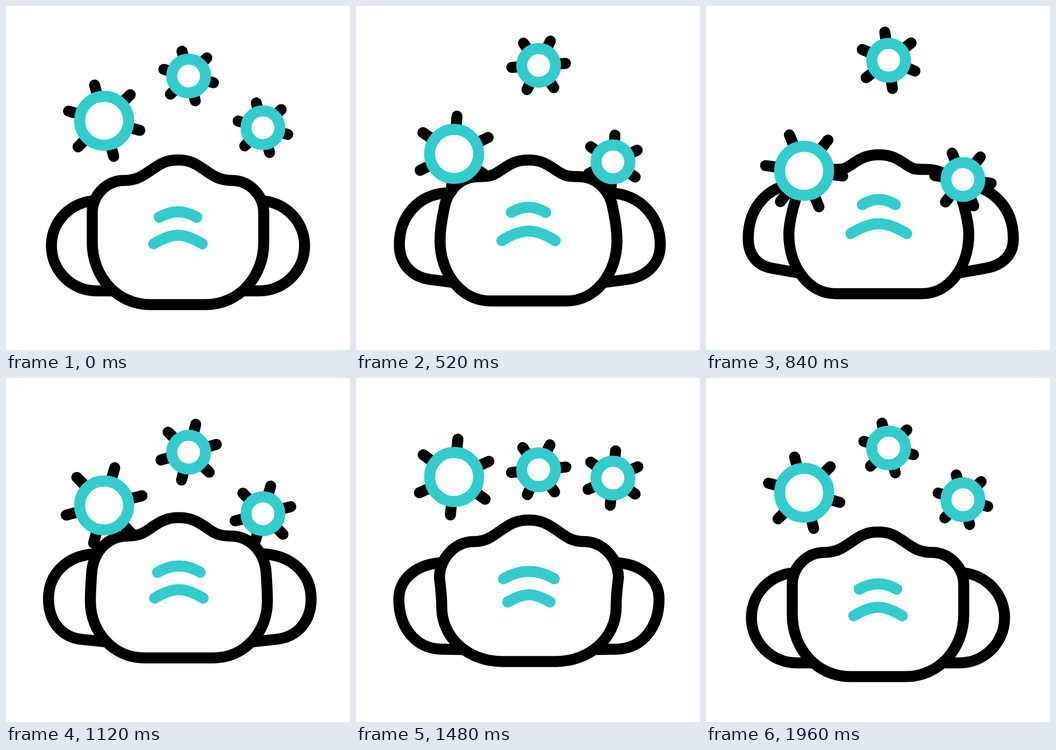
An HTML page with a canvas for the animation above (2 s loop, 640 by 640 pixels).

```html
<!DOCTYPE html>
<html>
<head>
<meta charset="utf-8">
<style>
html, body { margin: 0; width: 100%; height: 100%; overflow: hidden; background: #fff; }
canvas { display: block; width: 640px; height: 640px; }
</style>
</head>
<body>
<canvas id="c" width="640" height="640"></canvas>
<script>
const ctx = document.getElementById('c').getContext('2d');
const LOOP = 2000, STEP = 40, LINE = 20.5;
const BEGIN = 120, END = 1960, SQUASH = 780, STRETCH = 1420;
const TEAL = '#33cccc', BLACK = '#000', WHITE = '#fff';

const clamp = u => Math.min(1, Math.max(0, u));
const ease = u => u * u * (3 - 2 * u);
const ramp = (t, from, to) => ease(clamp((t - from) / (to - from)));

// Everything goes from rest to a squashed pose, to a stretched pose and back.
// The blend adds the offset of each pose by its current weight.
function blend(t, peak = STRETCH) {
  const turn = ramp(t, SQUASH, peak);
  const squash = ramp(t, BEGIN + 20, SQUASH) - turn;
  const stretch = turn - ramp(t, peak, END);
  return (rest, a, b) => rest + squash * a + stretch * b;
}

function trace(p) {
  ctx.beginPath();
  ctx.moveTo(...p[0]);
  for (let i = 1; i + 2 < p.length; i += 3) {
    ctx.bezierCurveTo(...p[i], ...p[i + 1], ...p[i + 2]);
  }
}

function stroke(color) {
  ctx.strokeStyle = color;
  ctx.stroke();
}

const flip = (p, cx) => p.map(([x, y]) => [2 * cx - x, y]);

function strap(mix, edge) {
  const top = [168, mix(362.5, -23, 3)];
  const side = [edge, mix(446, -3, -13)];
  const corner = [mix(168, -46, -10), mix(530, -33, -3.5)];
  const tail = [mix(200, -28, 0), mix(530, -24, -2.5)];
  const k = mix(0.55, 0.07, 0.07);
  const reach = k * (corner[0] - edge);
  const slope = (tail[1] - corner[1]) / (tail[0] - corner[0]);
  return [
    top,
    [top[0] - k * (top[0] - edge), top[1] + mix(0, 5, 0)],
    [edge, side[1] - 0.55 * (side[1] - top[1])],
    side,
    [edge, side[1] + 0.55 * (corner[1] - side[1])],
    [corner[0] - reach, corner[1] - slope * reach],
    corner,
    corner, tail, tail
  ];
}

function mask(mix, cx) {
  const shoulder = [mix(220, 13, 0), mix(324.5, -11, 2)];
  const [ax, ay] = [mix(160.5, 5, -5.5), mix(385, -11, 9)];
  const [bx, by] = [mix(160.5, -6.5, -1), mix(440, -6, 9)];
  const [dx, dy] = [mix(268, -28, 4), mix(555.5, -10.5, -6)];
  const [sx, sy] = shoulder;
  const half = [
    [cx, 286.5],
    [cx - 25, 286.5], [284, 296], [273, 303.3],
    [257, 314], [sx + 25, sy], shoulder,
    [sx - 0.55 * (sx - ax), sy], [ax + mix(0, 8, 1), ay - 0.55 * (ay - sy)], [ax, ay],
    [ax, ay], [bx, by - 0.4 * (by - ay)], [bx, by],
    [bx, by + 0.55 * (dy - by)], [dx - 0.57 * (dx - bx), dy], [dx, dy]
  ];
  const other = flip(half, cx).reverse();
  trace([...half, [dx, dy], other[0], ...other]);
  ctx.closePath();
  ctx.fillStyle = WHITE;
  ctx.fill();
  stroke(BLACK);
}

function fold(cx, half, y, peak, pull) {
  const c = (peak - 0.25 * y) / 0.75, d = half * (1 - 2 * pull);
  trace([[cx - half, y], [cx - d, c], [cx + d, c], [cx + half, y]]);
  stroke(TEAL);
}

function germ(x, y, r, reach, deg) {
  ctx.beginPath();
  for (let i = 0; i < 6; i++) {
    const a = (deg + 60 * i) * Math.PI / 180;
    ctx.moveTo(x + r * Math.cos(a), y + r * Math.sin(a));
    ctx.lineTo(x + reach * Math.cos(a), y + reach * Math.sin(a));
  }
  stroke(BLACK);
  ctx.beginPath();
  ctx.arc(x, y, r, 0, 2 * Math.PI);
  ctx.fillStyle = WHITE;
  ctx.fill();
  stroke(TEAL);
}

function drawMask(t) {
  const mix = blend(t), cx = mix(320, 1.5, 1.8);
  const lift = 30 * (ramp(t, 580, 1260) - ramp(t, 1260, 1920));
  ctx.save();
  ctx.translate(0, -lift);
  trace(strap(mix, mix(84.5, -6, -5)));
  stroke(BLACK);
  trace(flip(strap(mix, mix(84.5, -13.5, -5)), cx));
  stroke(BLACK);
  mask(mix, cx);
  fold(cx, mix(35, -4.7, 12.7), mix(393, -14, 3), mix(383, -13.5, -1), 0.33);
  fold(cx, mix(45.3, 7, -6), mix(442.5, -9.5, -3.5), mix(426.5, -12, -1), 0.39);
  ctx.restore();
}

function drawGerms(t) {
  const u = clamp((t - BEGIN) / (END - BEGIN));
  const turn = 180 * (0.8 * ease(u ** 1.15) + 0.2 * u);
  const grow = 5.8 * Math.sin(Math.PI * u) ** 2;
  germ(182.6, blend(t, 1400)(213.5, 96.5, -31), 45.6, 68.7 + 0.72 * grow, 15 + turn);
  germ(339.8, blend(t, 1430)(130.3, -31, 41.4), 31.5, 47.8 + grow, 15 - turn);
  germ(478, blend(t, 1440)(226.5, 99.5, -41), 31.5, 47.8 + grow, 15 + turn);
}

function draw(t) {
  ctx.fillStyle = WHITE;
  ctx.fillRect(0, 0, 640, 640);
  ctx.lineWidth = LINE;
  ctx.lineCap = ctx.lineJoin = 'round';
  drawMask(t);
  drawGerms(t);
}

const start = performance.now();
function tick() {
  const t = (performance.now() - start) % LOOP;
  draw(Math.floor(t / STEP) * STEP);
  requestAnimationFrame(tick);
}
tick();
</script>
</body>
</html>
```
